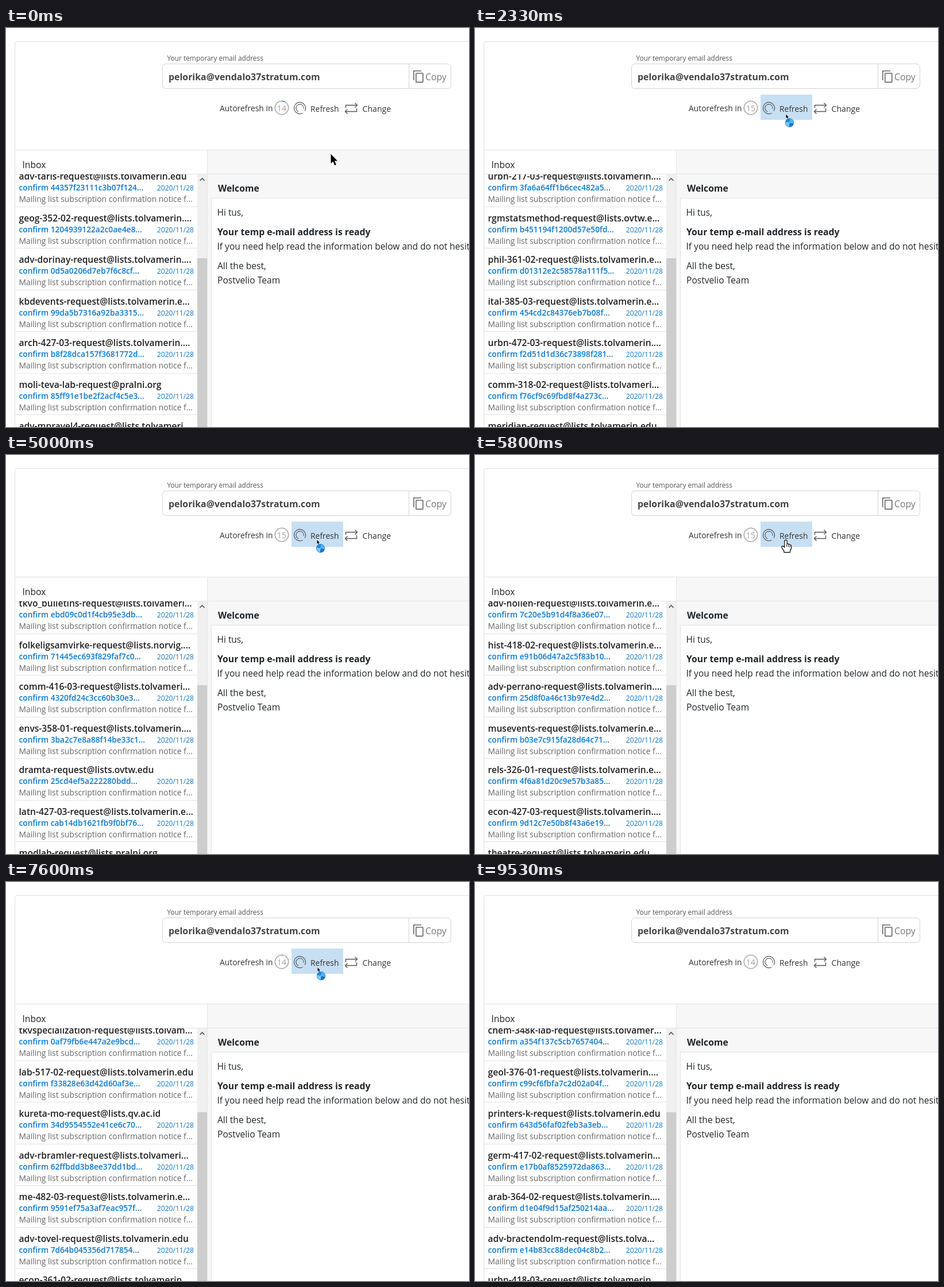
An HTML page with a canvas that plays this animation: 806x695 px, repeating every 9.59 s.

```html
<!DOCTYPE html>
<html lang="en">
<head>
<meta charset="utf-8">
<title>Temporary inbox</title>
<style>
html, body { margin: 0; width: 100%; height: 100%; overflow: hidden; background: #fff; }
canvas { display: block; }
</style>
</head>
<body>
<canvas id="stage" width="806" height="695"></canvas>
<script>
const ctx = document.getElementById('stage').getContext('2d', { alpha: false });
const LOOP = 9590;
const FONT = '"Open Sans", "Noto Sans", sans-serif';

// Sender and confirmation code; "*" is the usual list host.
const inboxes = [
  { at: 0, rows: `adv-tarls* 44357f23111c3b07f124
geog-352-02* 1204939122a2c0ae4e8
adv-dorinay* 0d5a0206d7eb7f6c8cf
kbdevents* 99da5b7316a92ba3315
arch-427-03* b8f28dca157f3681772d
moli-teva-lab-request@pralni.org 85ff91e1be2f2acf4c5e3
adv-mpravel4*` },
  { at: 1200, rows: `urbn-217-03* 3fa6a64ff1b6cec482a5
rgmstatsmethod-request@lists.ovtw.edu b451194f1200d57e50fd
phil-361-02* d01312e2c58578a111f5
ital-385-03* 454cd2c84376eb7b08f
urbn-472-03* f2d51d1d36c73898f281
comm-318-02* f76cf9c69fbd8f4a273c
meridian*` },
  { at: 2730, rows: `mus-245-02* 4228f6b52f83fdae234
chem-374-01* fa6a2050e228e7de671
econ-316-02* 578da96cb0dafe2e22f
morvel-request@mailman.vog.org.uk dba2a605ce92e53e2d
math-458-02* fb1f28fe2a68a5707596
kbd_publications_desk* 1023d7090c6cd7f244a
russ-527-03*` },
  { at: 4130, rows: `tkvo_bulletins* ebd09c0d1f4cb95e3db
folkeligsamvirke-request@lists.norvig.no 71445ec693f829faf7c0
comm-416-03* 4320fd24c3cc60b30e3
envs-358-01* 3ba2c7e8a88f14be33c1
dramta-request@lists.ovtw.edu 25cd4ef5a222280bdd
latn-427-03* cab14db1621fb9f0bf76
modlab-request@lists.pralni.org` },
  { at: 5400, rows: `adv-hollen* 7c20e5b91d4f8a36e07
hist-418-02* e91b06d47a2c5f83b10
adv-perrano* 25d8f0a46c13b97e4d2
musevents* b03e7c915fa28d64c71
rels-326-01* 4f6a81d20c9e57b3a85
econ-427-03* 9d12c7e50b8f43a6e19
theatre*` },
  { at: 6730, rows: `tkvspecialization* 0af79fb6e447a2e9bcd
lab-517-02* f33828e63d42d60af3e
kureta-mo-request@lists.qv.ac.id 34d9554552e41ce6c70
adv-rbramler* 62ffbdd3b8ee37dd1bd
me-482-03* 9591ef75a3af7eac957f
adv-tovel* 7d64b045356d717854
econ-361-02*` },
  { at: 7730, rows: `chem-348k-lab* a354f137c5cb7657404
geol-376-01* c99cf6fbfa7c2d02a04f
printers-k* 643d56faf02feb3a3eb
germ-417-02* e17b0af8525972da863
arab-364-02* d1e04f9d15af250214aa
adv-bractendolm* e14b83cc88dec04c8b2
urbn-418-03*` }
].map(b => ({ at: b.at, rows: b.rows.split('\n').map(r => {
  const [from, code = ''] = r.split(' ');
  return { from: from.replace('*', '-request@lists.tolvamerin.edu'), code };
}) }));

const counts = [[-1200, 14], [1200, 15], [3330, 14], [4330, 15], [7270, 14], [7730, 15], [9470, 14]];
const busy = [[800, 1270], [2330, 2800], [5000, 5470], [6330, 6800], [7530, 7800]];
const lit = [[400, 1270], [1400, 5470], [5600, 6800], [6930, 8000]];
const path = [[0, 565.5, 219.5], [70, 565.5, 219.5], [600, 541, 149], [3270, 541, 149], [3470, 541, 139.5],
  [4000, 541, 139.5], [4330, 541, 146.5], [5400, 541, 146.5], [5930, 541, 149], [7300, 541, 149],
  [7600, 542, 147.5], [7930, 542, 147.5], [8670, 698, 700]];

const inside = (spans, t) => spans.some(([a, b]) => t >= a && t < b);

function pointer(t) {
  const i = path.findIndex(p => p[0] > t);
  if (i < 0) return null;
  const [t0, x0, y0] = path[i - 1], [t1, x1, y1] = path[i];
  let k = (t - t0) / (t1 - t0);
  k = k * k * (3 - 2 * k);
  return [x0 + (x1 - x0) * k, y0 + (y1 - y0) * k];
}

function text(s, x, y, size, color, weight = 400, align = 'left') {
  ctx.font = `${weight} ${size}px ${FONT}`;
  ctx.textAlign = align;
  ctx.fillStyle = color;
  ctx.fillText(s, x, y);
}

function fit(s, max, size, weight) {
  ctx.font = `${weight} ${size}px ${FONT}`;
  if (ctx.measureText(s).width <= max) return s;
  while (ctx.measureText(s + '...').width > max) s = s.slice(0, -1);
  return s + '...';
}

function rect(x, y, w, h, color) {
  ctx.fillStyle = color;
  ctx.fillRect(x, y, w, h);
}

function line(points, color, width = 1) {
  ctx.beginPath();
  points.forEach(([x, y]) => ctx.lineTo(x, y));
  ctx.strokeStyle = color;
  ctx.lineWidth = width;
  ctx.stroke();
}

function arc(x, y, r, from, to, color, width) {
  ctx.beginPath();
  ctx.arc(x, y, r, from * Math.PI / 180, to * Math.PI / 180);
  ctx.strokeStyle = color;
  ctx.lineWidth = width;
  ctx.stroke();
}

function box(x, y, w, h, r, color, width = 1) {
  ctx.beginPath();
  ctx.roundRect(x, y, w, h, r);
  ctx.strokeStyle = color;
  ctx.lineWidth = width;
  ctx.stroke();
}

function drawHeader(t) {
  box(15.5, 23.5, 900, 900, 4, '#e1e1e1');
  text('Your temporary email address', 280.5, 57, 11.9, '#555');
  box(272.5, 62.5, 502, 43, 6, '#d3d3d3');
  line([[701.5, 63], [701.5, 105]], '#d3d3d3');
  text('pelorika@vendalo37stratum.com', 283, 91, 15.9, '#444', 700);
  line([[709.8, 91], [709.8, 74.8], [723, 74.8]], '#666', 1.6);
  box(713.8, 78.8, 12, 15.6, 1, '#666', 1.6);
  text('Copy', 730, 91, 15.8, '#777');

  if (inside(lit, t)) rect(497, 116, 90, 44, '#c7dff3');
  text('Autorefresh in', 372, 145, 13.9, '#333');
  drawTimer(t);
  arc(511.5, 139.5, 10, 60, 390, '#555', 1.2);
  arc(511.5, 139.5, 6.6, 110, 370, '#555', 1.2);
  text('Refresh', 530, 145.5, 13.9, '#333');
  line([[591.5, 139], [591.5, 134.5], [611, 134.5]], '#555', 1.4);
  line([[607.5, 130.5], [611.5, 134.5], [607.5, 138.5]], '#555', 1.4);
  line([[610.5, 140], [610.5, 145.5], [591, 145.5]], '#555', 1.4);
  line([[594.5, 141.5], [590.5, 145.5], [594.5, 149.5]], '#555', 1.4);
  text('Change', 620.5, 145.5, 14.1, '#333');
}

function drawTimer(t) {
  const [start, n] = counts.findLast(c => c[0] <= t);
  const sweep = n === 14 ? (t - start) * 0.024
    : Math.min(1, Math.max(0, (t - 8730) / 200)) * 8;
  arc(480, 139, 11.7, 0, 360, '#a8a8a8', 1.6);
  if (sweep > 2) arc(480, 139, 11.7, -90, sweep - 90, '#3f8fe0', 1.6);
  text(n, 480, 144.5, 13.8, '#a59d94', 400, 'center');
}

function drawInbox(t) {
  text('Inbox', 28.5, 244, 15.7, '#222');
  const { rows } = inboxes.findLast(b => b.at <= t);
  ctx.save();
  ctx.beginPath();
  ctx.rect(16, 255, 317, 440);
  ctx.clip();
  rows.forEach(({ from, code }, i) => {
    const y = Math.round(238 + 72.55 * i);
    rect(16, y, 317, 1, '#e3e3e3');
    text(fit(from, 304, 15.6, 600), 22.5, y + 25.5, 15.6, '#1f1f1f', 600);
    text(`confirm ${code}...`, 22.5, y + 45, 13.7, '#0b78d0', 600);
    text('2020/11/28', 327, y + 45, 12.1, '#0b78d0', 400, 'right');
    text('Mailing list subscription confirmation notice f...', 22.5, y + 64.5, 13.9, '#666');
  });
  ctx.restore();
  rect(16, 254, 334, 1, '#e3e3e3');
  rect(333, 255, 17, 440, '#f0f0f0');
  rect(333, 401, 17, 294, '#cdcdcd');
  line([[337.5, 266], [341.5, 262], [345.5, 266]], '#505050', 1.6);
}

function drawMessage() {
  rect(350, 212, 456, 483, '#f7f7f8');
  rect(16, 212, 790, 1, '#e3e3e3');
  rect(350, 212, 1, 483, '#e5e5e5');
  rect(351, 254, 455, 1, '#e5e5e5');
  rect(357, 296, 449, 399, '#e3e3e3');
  rect(358, 297, 448, 398, '#fff');
  const ink = '#212529';
  text('Welcome', 369, 285, 15.8, ink, 700);
  text('Hi tus,', 367.5, 327, 15.5, ink);
  text('Your temp e-mail address is ready', 368, 360.5, 15.8, ink, 700);
  text('If you need help read the information below and do not hesitate', 367.5, 386, 15.5, ink);
  text('All the best,', 368, 419.5, 15.6, ink);
  text('Postvelio Team', 368, 444.5, 15.6, ink);
}

function shape(d, fill, stroke, width) {
  const p = new Path2D(d);
  ctx.lineWidth = width;
  ctx.lineJoin = 'round';
  ctx.strokeStyle = stroke;
  ctx.stroke(p);
  ctx.fillStyle = fill;
  ctx.fill(p);
}

const ARROW = 'M0 0V16.5L3.8 13L6.7 19.7L9.4 18.5L6.5 12H11.5Z';
const HAND = 'M-1.6 1Q0 -.8 1.6 1V7Q3.6 5.8 4.6 7.6Q6.4 6.8 7 8.6Q9 8 9 10.2V14L7 18V20.5H-2.5V18.5L-6.2 13Q-7.4 10.6-5 10.6L-1.6 13.5Z';

function drawBall(x, y) {
  ['#1673c8', '#7cc9f3', '#1b8ae0', '#4fb3ee'].forEach((c, i) => {
    ctx.beginPath();
    ctx.moveTo(x, y);
    ctx.arc(x, y, 7.6, (i * 90 + 10) * Math.PI / 180, (i * 90 + 100) * Math.PI / 180);
    ctx.fillStyle = c;
    ctx.fill();
  });
  arc(x, y, 7.2, 0, 360, '#2a86cf', 0.8);
}

function drawPointer(t) {
  const pos = pointer(t);
  if (!pos) return;
  const [x, y] = pos;
  ctx.save();
  ctx.translate(x, y);
  if (inside(busy, t)) {
    drawBall(6.5, 16);
    ctx.translate(0.5, 1.5);
    ctx.scale(0.4, 0.4);
    shape(ARROW, '#000', '#fff', 2);
  } else if (y < 160 && t < 8000) {
    shape(HAND, '#fff', '#000', 2.4);
    line([[1.6, 7], [1.6, 11]], '#000');
    line([[4.6, 8], [4.6, 11.5]], '#000');
    line([[7, 9], [7, 12]], '#000');
  } else {
    shape(ARROW, '#000', '#fff', 2);
  }
  ctx.restore();
}

function frame(t) {
  rect(0, 0, 806, 695, '#fff');
  drawHeader(t);
  drawMessage();
  drawInbox(t);
  drawPointer(t);
}

const begin = performance.now();
function tick() {
  // Rounding to 10 ms keeps hard changes on their exact times.
  const now = Math.round((performance.now() - begin) / 10) * 10;
  frame(now % LOOP);
  requestAnimationFrame(tick);
}
tick();
</script>
</body>
</html>
```
